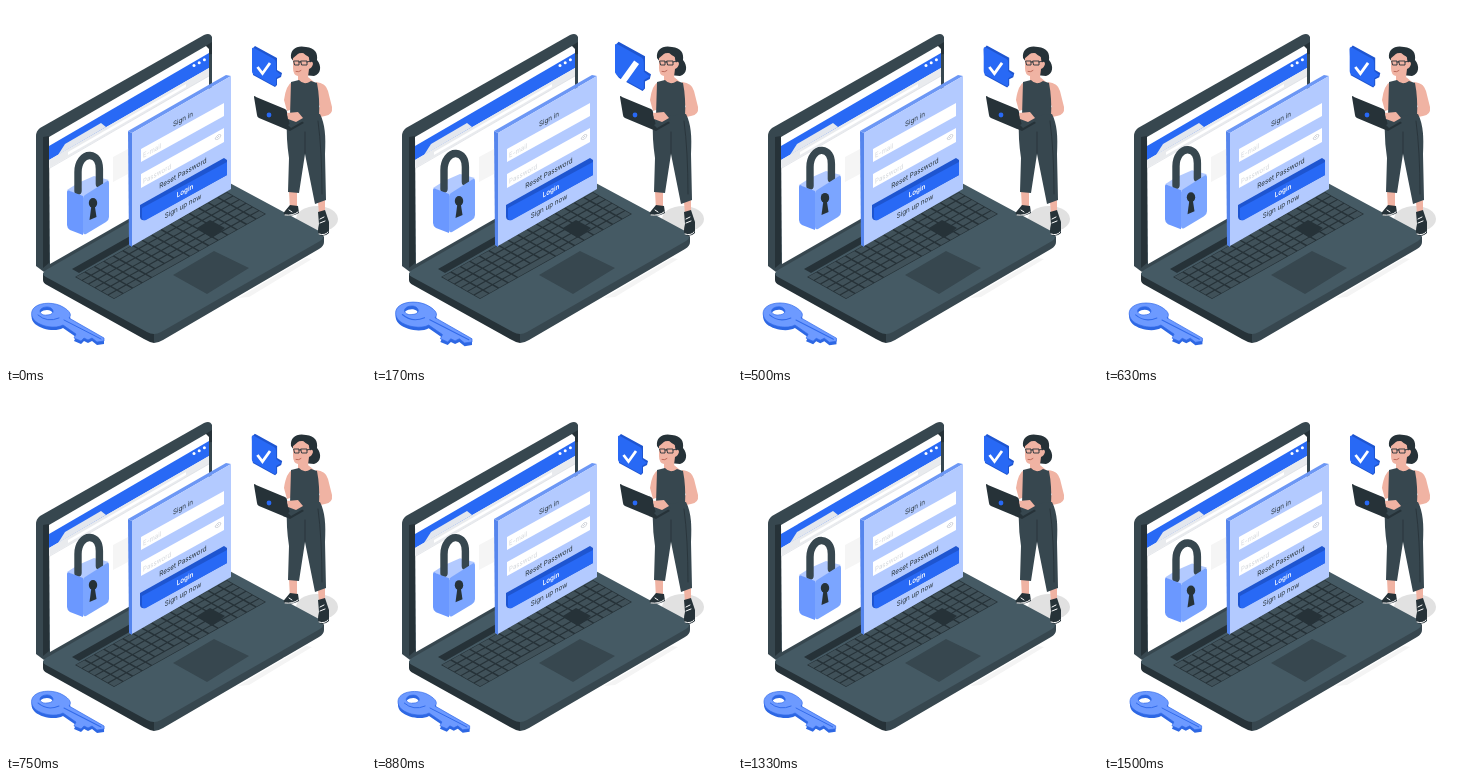
An HTML page that plays this animation: 360x360 px, repeating every 1540 ms.

```html
<!DOCTYPE html>
<html lang="en">
<head>
<meta charset="utf-8">
<title>Sign in</title>
<style>
html, body { margin: 0; width: 100%; height: 100%; overflow: hidden; background: #fff; }
svg { display: block; width: 100vw; height: 100vh; }
text { font-family: Inter, Roboto, sans-serif; font-size: 7.2px; fill: #263238; }
.hint { fill: #d3d7dc; font-size: 7px; }
.ink { fill: #263238; }
.dark { fill: #37474f; }
.slate { fill: #455a64; }
.blue { fill: #2869f5; }
.deep { fill: #1e55d0; }
.sky { fill: #7ba5ff; }
.pale { fill: #b3caff; }
.white { fill: #fff; }
.skin { fill: #f0b3a3; }
.line { fill: none; stroke-linecap: round; stroke-linejoin: round; }
</style>
</head>
<body>
<svg viewBox="0 0 360 360">
  <!-- floor shadows -->
  <path fill="#f4f4f4" d="M232 292L300 252L306 253L243 291Z"/>
  <ellipse cx="311" cy="213" rx="21" ry="13" fill="#e1e1e1"/>

  <!-- lid -->
  <path class="dark" d="M30 130Q30 125 34 122L198 29Q204 26 206 31V178L38 266L30 260Z"/>
  <path class="ink" d="M37 131L43 130V257L37 262Z"/>
  <path class="ink" d="M198 41L206 36V48L198 49Z"/>
  <path class="white" d="M43 131L200 40L203 43V167L44 258Z"/>
  <path class="blue" d="M43 140L203 47V62L43 154Z"/>
  <path fill="#e3e7ee" d="M52 149L59 138L95 117L100 121Z"/>
  <path fill="#e9ebee" d="M43 154L203 62V70L43 162Z"/>
  <path class="white" d="M62 146L180 78V81L62 149Z"/>
  <path fill="none" stroke="#d3d7dd" stroke-width=".6" d="M44 162L203 70"/>
  <g class="white">
    <circle cx="188" cy="59.5" r="1.5"/><circle cx="193.2" cy="56.7" r="1.5"/><circle cx="198.4" cy="53.8" r="1.5"/>
  </g>
  <path fill="#f5f5f5" d="M107 151L122 143V168L107 176Z"/>

  <!-- padlock -->
  <g id="lock">
    <path class="pale" d="M61 184L72 177L88 170L103 174L77 191Z"/>
    <path class="line" stroke="#37474f" stroke-width="7.4" stroke-linecap="butt" d="M72 185V166C72 156 78 149 84 149.5C90 150 93.4 155 93.4 163V178"/>
    <path fill="#6b98ff" d="M61 186Q61 183 64 185L77 190V229L64 224Q61 222 61 219Z"/>
    <path class="sky" d="M77 192Q77 190 79 189L101 175Q103 174 103 177V211Q103 214 100 216L80 228Q77 229 77 226Z"/>
    <ellipse class="ink" cx="87" cy="197" rx="4.2" ry="5"/>
    <path class="ink" d="M85.5 199L88.5 198L90.5 211L83.5 214Z"/>
  </g>

  <!-- base -->
  <path class="ink" d="M37 267L148 327V337Q143 336 138 333L41 279Q37 277 37 274Z"/>
  <path class="dark" d="M148 327L318 230V236Q318 240 313 243L157 334Q152 337 148 337Z"/>
  <path class="slate" d="M40 264L207 168L313 225Q321 230 314 235L155 326Q148 330 141 326L40 271Q34 268 40 264Z"/>
  <path class="ink" d="M66 263L200 187L207 190L73 267Z"/>
  <path class="ink" d="M69 271L221 186L260 208L108 293Z"/>
  <g id="keys" fill="#405159"></g>
  <path class="ink" d="M191 222L204 214L219 222L206 232Z"/>
  <path class="dark" d="M167 269L208 245L243 262L201 288Z"/>

  <!-- sign-in card -->
  <path fill="#5585ed" d="M122 125L126 127V241L123 239Z"/>
  <path fill="#6c97f5" d="M122 125L220 69L225 70L126 127Z"/>
  <path class="pale" d="M126 127L225 70V183L126 240Z"/>
  <path class="white" d="M135 143L218 97V110L135 156ZM135 168L218 122V136L135 182Z"/>
  <path class="deep" d="M134 199L218 152L221 154V169L139 214Q135 215 134 211Z"/>
  <path class="blue" d="M136 202L221 156V169L140 214Q136 215 136 211Z"/>
  <path fill="none" stroke="#c6cad2" stroke-width=".8" d="M209 133Q212 127 215 129Q213 135 209 133M211 132L213 130"/>
  <g id="labels"></g>

  <!-- woman -->
  <path class="ink" d="M285 52C284 43 291 39 300 41C309 42 312 47 311 54C316 60 315 68 308 70L298 69Z"/>
  <path class="skin" d="M287 51Q292 45 302 48L304 56Q307 55 307 58Q306 62 303 63L302 71L308 76L299 80L292 76V70Q287 69 287 62Z"/>
  <path class="ink" d="M286 53Q291 49 295 45Q299 49 303 51L304 57L307 50L300 42L289 43Z"/>
  <path class="line" stroke="#263238" stroke-width=".9" d="M288 55H293V59H289ZM295 55H301V59H296ZM301 56L305 55M293 56H295"/>
  <path class="line" stroke="#b86454" stroke-width=".9" d="M290 65.5Q293 66.5 295 64.5"/>
  <path class="skin" d="M286 76Q280 79 278 94L281 105L290 102ZM310 76Q320 77 322 85L326 101Q327 109 319 110L294 115L285 113Q281 110 287 108L298 106L314 101L309 90Z"/>
  <path class="dark" d="M285 76L293 74Q298 80 305 75L311 77Q314 92 313 111L284 110Z"/>
  <path class="skin" d="M283 185H291V204H284ZM312 196L319 194V207L313 208Z"/>
  <path class="dark" d="M283 111L314 108C319 118 320 130 319 148L320 194L309 198L299 148L293 187L282 186L283 152Q280 132 281 116Z"/>
  <path class="line" stroke="#263238" stroke-width=".8" d="M299 126V147M312 115Q316 145 316 188"/>
  <path class="ink" d="M284 199L292 200L293 207Q288 210 280 210Q276 208 279 205ZM312 206L319 204L323 216V227Q319 231 313 229Q311 226 313 218Z"/>
  <path class="line" stroke="#fff" stroke-width="1" d="M279 209Q287 210 292 206M283 204L286 206M313 228Q319 230 322 226M314 213L318 211M314 217L319 215"/>
  <path class="ink" d="M248 91Q248 89 250 91L279 103Q281 104 281 106L284 120L295 114L298 117L284 125L253 112Q251 111 251 109Z"/>
  <path class="dark" d="M282 119L294 112L299 114L285 122Z"/>
  <circle class="blue" cx="263" cy="109" r="2.4"/>
  <path class="skin" d="M281 107L292 106L297 112L290 116L282 113Z"/>

  <!-- speech bubble -->
  <g id="bubble">
    <path class="deep" d="M246 43L249 40L271 52V64L276 67L275 71L271 73V79L269 81L247 69Z"/>
    <path class="blue" d="M246 43Q246 41 248 42L268 53Q270 54 270 57V65L275 69L270 72V78Q270 81 267 79L249 69Q246 68 246 65Z"/>
    <path id="tick" fill="none" stroke="#fff" stroke-width="2.8" d="M251.5 61L256.5 67.5L264 57"/>
  </g>

  <!-- key -->
  <g id="key">
    <g id="keyDepth" fill="#2d67e3" transform="translate(0 3)"></g>
    <g id="keyFace" fill="#6d9aff" stroke="#326bea" stroke-width=".7"></g>
    <path class="line" stroke="#326bea" stroke-width="1" d="M58 314L95 333M32 309Q41 317 53 312"/>
  </g>
</svg>
<script>
const LOOP = 1540, STEPS = 37;
const $ = id => document.getElementById(id);

function add(parent, tag, attrs, text) {
  const node = document.createElementNS("http://www.w3.org/2000/svg", tag);
  for (const name in attrs) node.setAttribute(name, attrs[name]);
  if (text) node.textContent = text;
  parent.append(node);
  return node;
}

// Key caps on the plane spanned by a row vector and a column vector.
const at = (u, v) => `${69 + 152 * u + 39 * v} ${271 - 85 * u + 22 * v}`;
let caps = "";
for (let row = 0; row < 6; row++) {
  for (let i = 0; i < 16; i++) {
    const span = row === 5 && i === 4 ? 4 : 1;
    const a = (i + .08) / 16, b = (i + span - .08) / 16;
    const c = (row + .08) / 6, d = (row + .9) / 6;
    caps += `M${at(a, c)}L${at(b, c)}L${at(b, d)}L${at(a, d)}Z`;
    i += span - 1;
  }
}
add($("keys"), "path", { d: caps });

const label = (text, x, y, anchor, extra) => add($("labels"), "text", {
  transform: `matrix(.87 -.485 0 1 ${x} ${y})`, "text-anchor": anchor, ...extra
}, text);
label("Sign in", 177, 115.5, "middle");
label("E-mail", 137, 152, "start", { class: "hint" });
label("Password", 137, 178, "start", { class: "hint" });
label("Reset Password", 177, 169.5, "middle");
label("Login", 179, 187, "middle", { style: "fill:#fff;font-weight:600" });
label("Sign up now", 177, 202.5, "middle");

const outline = "M29 301C35 296 49 296 57 301C64 305 66 309 63 312L98 332V335L91 336L86 332L82 334L78 332L75 335L68 332L70 328L57 319C50 323 36 321 29 315C24 310 25 304 29 301Z" +
  "M35 303C32 306 36 310 41 309C47 309 49 305 45 302C42 300 37 301 35 303Z";
for (const id of ["keyDepth", "keyFace"]) add($(id), "path", { d: outline, "fill-rule": "evenodd" });

// Eased value from a short list of [ms, value] stops.
function track(stops, t) {
  const n = stops.findIndex(s => s[0] > t);
  if (n < 0) return stops.at(-1)[1];
  const [t0, a] = stops[n - 1], [t1, b] = stops[n];
  return a + (b - a) * (1 - Math.cos(Math.PI * (t - t0) / (t1 - t0))) / 2;
}

const keyScale = [[0, 1], [170, 1.055], [330, 1.015], [630, 1.012], [880, .99], [1500, .99], [1540, 1]];
const bubbleScale = [[0, 1], [170, 1.2], [330, 1.02], [630, 1.02], [880, 1], [1540, 1]];
const tickScale = [[0, 1], [60, 1], [170, 1.8], [280, 1], [1540, 1]];

const scaleAt = (id, x, y, s) =>
  $(id).setAttribute("transform", `translate(${x} ${y}) scale(${s}) translate(${-x} ${-y})`);

function draw(now) {
  const step = Math.floor((now % LOOP) / LOOP * STEPS + .01);
  const t = step / STEPS * LOOP;
  const lift = 6 * Math.sin(Math.PI * t / LOOP);
  $("lock").setAttribute("transform", `translate(0 ${-lift})`);
  scaleAt("key", 62, 318, track(keyScale, t));
  scaleAt("bubble", 261, 61, track(bubbleScale, t));
  scaleAt("tick", 264, 57, track(tickScale, t));
}

const start = performance.now();
function tick() {
  draw(performance.now() - start);
  requestAnimationFrame(tick);
}
tick();
</script>
</body>
</html>
```
